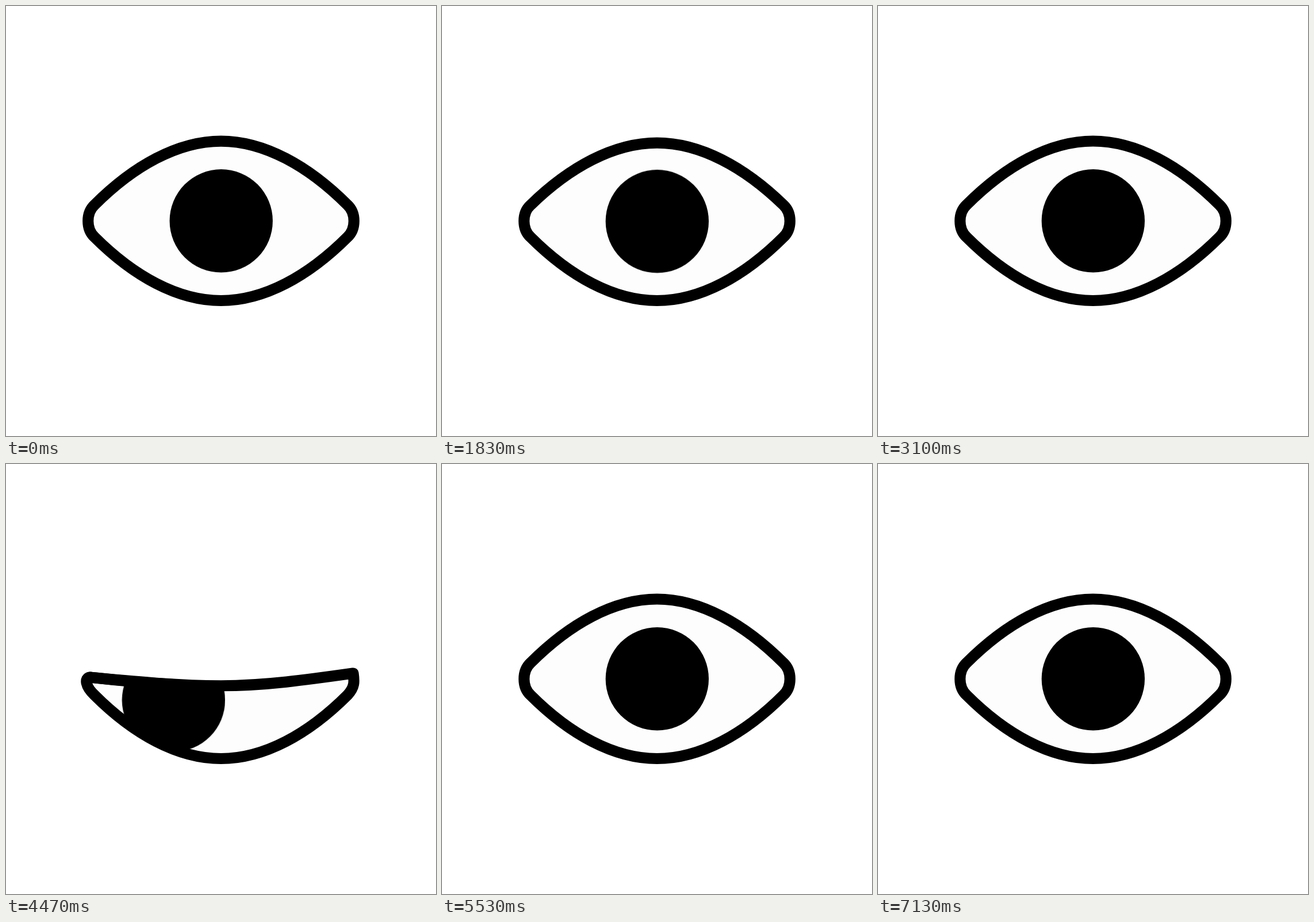
These frames come from a looping animation (748 px wide and 748 px high, 8060 ms). An HTML page:

```html
<!DOCTYPE html>
<html lang="en">
<head>
<meta charset="utf-8">
<title>Blinking eye</title>
<style>
  html, body { margin: 0; width: 100%; height: 100%; overflow: hidden; background: #fff; }
  svg { display: block; width: 100%; height: 100%; }

  :root {
    --open: path("M154 346 C222 278 299 235 374 235 C449 235 526 278 594 346 C609 360 609 388 594 402 C526 470 449 512.5 374 512.5 C299 512.5 222 470 154 402 C139 388 139 360 154 346 Z");
    --half: path("M146 371 C222 378 299 385.5 374 385.5 C450 385.5 525 375 604 364 C606 378 607 388 594 402 C526 470 449 512.5 374 512.5 C299 512.5 222 470 154 402 C138 387 136 372 146 371 Z");
    --low: path("M140 380 C203 418 290 452 374 452 C460 452 545 415 607 372 C607 388 606 392 596 402 C527 470 449 512.5 374 512.5 C299 512.5 221 470 150 401 C139 392 135 384 140 380 Z");
    --shut: path("M140 388 C212 464 299 512 374 512 C449 512 536 464 608 384 C607 390 603 393 594 402 C526 470 449 512.5 374 512.5 C299 512.5 222 470 154 402 C147 395 142 391 140 388 Z");
  }

  .lid, .pupil, .fold { animation: 4030ms linear infinite; }
  .lid { d: var(--open); animation-name: blink; }
  .pupil { animation-name: look; }
  .fold { opacity: 0; animation-name: fold; }
  .line { stroke: #000; stroke-width: 19.2; stroke-linejoin: round; }

  @keyframes blink {
    0%      { d: var(--open); animation-timing-function: cubic-bezier(.4, .08, .75, .8); }
    10.918% { d: var(--half); }
    17.37%  { d: var(--low); }
    20.596% { d: var(--shut); }
    21.588% { d: var(--shut); animation-timing-function: ease-in; }
    29.28%  { d: var(--half); animation-timing-function: cubic-bezier(.3, .4, .6, 1); }
    37.221% { d: var(--open); }
    44.665% { d: var(--open); animation-timing-function: cubic-bezier(.4, .08, .75, .8); }
    55.583% { d: var(--half); }
    62.035% { d: var(--low); }
    65.26%  { d: var(--shut); }
    66.253% { d: var(--shut); animation-timing-function: ease-in; }
    71.464% { d: var(--half); animation-timing-function: cubic-bezier(.3, .4, .6, 1); }
    76.923%, 100% { d: var(--open); }
  }

  /* first blink glances left, second one only dips */
  @keyframes look {
    0%      { transform: translate(0, 0); opacity: 1; animation-timing-function: cubic-bezier(.4, .08, .75, .8); }
    10.918% { transform: translate(-82.5px, 37px); opacity: 1; }
    14.144% { transform: translate(-130px, 20px); opacity: 1; }
    17.37%  { transform: translate(-178px, 3px); opacity: .5; }
    20.596%, 21.588% { transform: translate(-178px, 3px); opacity: 0; }
    25%     { transform: translate(-130px, 25px); opacity: 1; }
    29.28%  { transform: translate(-82.5px, 37px); opacity: 1; animation-timing-function: cubic-bezier(.3, .4, .6, 1); }
    37.221% { transform: translate(0, 0); opacity: 1; }
    44.665% { transform: translate(0, 0); opacity: 1; animation-timing-function: cubic-bezier(.4, .08, .75, .8); }
    55.583% { transform: translate(0, 37px); }
    65.26%, 66.253% { transform: translate(0, 68px); animation-timing-function: ease-in; }
    71.464% { transform: translate(0, 37px); animation-timing-function: cubic-bezier(.3, .4, .6, 1); }
    76.923%, 100% { transform: translate(0, 0); opacity: 1; }
  }

  /* pupil bulging over the falling lid */
  @keyframes fold {
    0%, 10.917% { opacity: 0; d: path("M146 371 C176 374 230 380 270 382 C285 383 295 384 300 384 L300 384 C260 382 190 376 146 371 Z"); }
    10.918% { opacity: 1; d: path("M146 371 C176 374 230 380 270 382 C285 383 295 384 300 384 L300 384 C260 382 190 376 146 371 Z"); }
    17.37%  { opacity: 1; d: path("M140 380 C170 388 205 391 238 395 C262 399 270 406 264 416 L258 428 C225 420 180 400 140 380 Z"); }
    20.596% { opacity: 1; d: path("M140 388 C163 411 185 431 208 448 C208 448 208 448 208 448 L208 448 C185 431 163 411 140 388 Z"); }
    20.6%, 100% { opacity: 0; d: path("M140 388 C163 411 185 431 208 448 C208 448 208 448 208 448 L208 448 C185 431 163 411 140 388 Z"); }
  }
</style>
</head>
<body>
<svg viewBox="0 0 748 748" role="img" aria-label="Blinking eye">
  <clipPath id="inside"><path class="lid"/></clipPath>
  <path class="lid" fill="#fdfdfd"/>
  <g clip-path="url(#inside)"><circle class="pupil" cx="374.3" cy="373.8" r="89.7"/></g>
  <path class="fold line"/>
  <path class="lid line" fill="none"/>
</svg>
</body>
</html>
```
